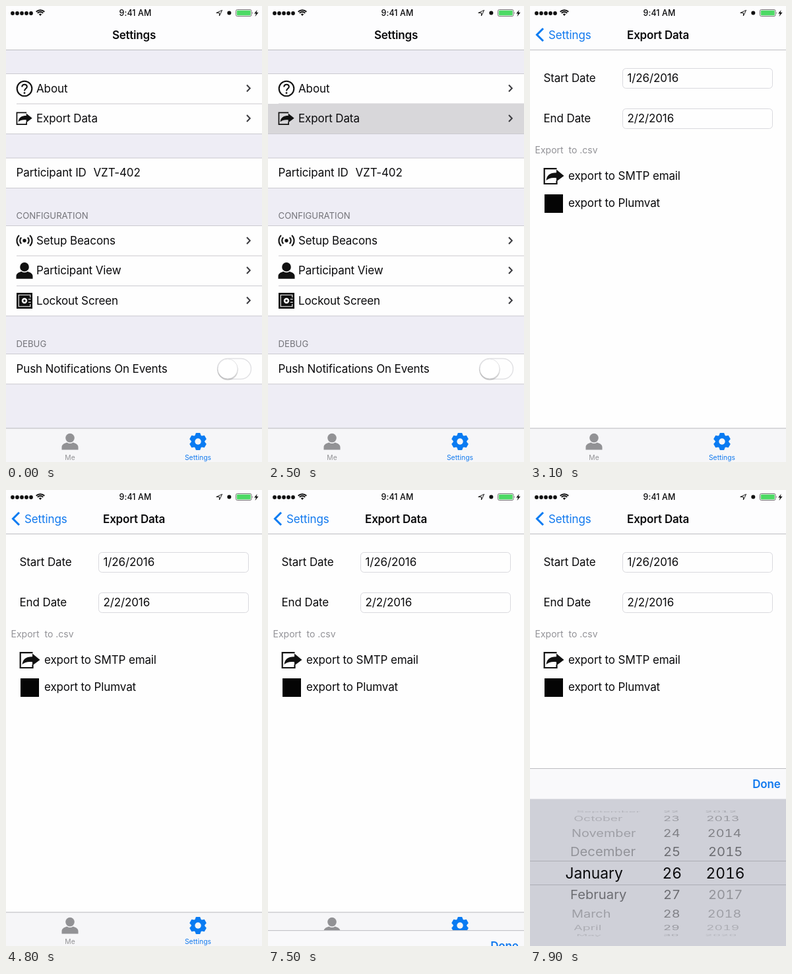
Write an HTML page that moves like this. It is 388x690 px and loops after 8000 ms.

```html
<!DOCTYPE html>
<html lang="en">
<head>
<meta charset="utf-8">
<title>Settings export</title>
<style>
html, body { margin: 0; width: 100%; height: 100%; overflow: hidden; background: #fefefe; }
svg { display: block; width: 388px; height: 690px; }
text { font: 17px Inter, sans-serif; letter-spacing: -.007em; white-space: pre; fill: #0a0a0c; }
.bold { font-weight: 600; letter-spacing: -.012em; }
.head { font-size: 13.2px; letter-spacing: 0; fill: #737379; }
.note { font-size: 14px; letter-spacing: 0; fill: #929297; }
.tab { font-size: 10.3px; letter-spacing: .005em; fill: #929295; }
.clock { font-size: 12.4px; letter-spacing: .01em; font-weight: 500; }
.wheel, .pick { letter-spacing: 0; font-variant-numeric: tabular-nums; }
.wheel { font-size: 20.2px; }
.pick { font-size: 22.8px; }
.blue { fill: #1179ee; }
.mid { text-anchor: middle; }
.end { text-anchor: end; }
</style>
</head>
<body>
<script>
const LOOP = 8000, FRAME = 100, W = 388;
const BLUE = '#0a7bf2', GREY = '#929295';

const text = (x, y, str, cls = '', more = '') => `<text x="${x}" y="${y}" class="${cls}" ${more}>${str}</text>`;
const rect = (x, y, w, h, fill, more = '') => `<rect x="${x}" y="${y}" width="${w}" height="${h}" fill="${fill}" ${more}/>`;
const rule = (x, y, color = '#cbcad0') => rect(x, y, W - x, 1, color);
const circle = (x, y, r, fill = '#111', more = '') => `<circle cx="${x}" cy="${y}" r="${r}" fill="${fill}" ${more}/>`;
const path = (d, more = 'fill="#111"') => `<path d="${d}" ${more}/>`;
const stroke = (d, width, color = '#111') => path(d, `fill="none" stroke="${color}" stroke-width="${width}"`);
const group = (body, more = '') => `<g ${more}>${body}</g>`;
const at = (x, y, body, scale = 1) => group(body, `transform="translate(${x} ${y}) scale(${scale})"`);

// Icons
const person = fill => circle(0, -5.4, 6.8, fill) +
  path('M-12.5 12.5V8.4C-12.5 4.2 -8 2.4 -4.6 1.4Q0 4.4 4.6 1.4C8 2.4 12.5 4.2 12.5 8.4V12.5Z', `fill="${fill}"`);

const share = stroke('M20 1.2H1.2V24H20V19.5', 2.2) +
  path('M4 19C5 10 11 7.2 19.5 7.2V2.6L31 12L19.5 20.4V15.2C12 14.6 8 15.5 4 19Z');

const help = stroke('M-11.3 0A11.3 11.3 0 1 0 11.3 0A11.3 11.3 0 1 0 -11.3 0', 2.1) +
  stroke('M-3.7 -2.6C-3.7 -7.6 3.8 -7.4 3.8 -2.7C3.8 0 0 .2 0 3.4', 2.1) + circle(0, 6.6, 1.4);

const arc = (r, side) => {
  const x = side * r * .72, y = r * .72;
  return stroke(`M${x} ${-y}A${r} ${r} 0 0 ${side > 0 ? 1 : 0} ${x} ${y}`, 2.1);
};
const beacon = circle(0, 0, 2.7) + [-1, 1].map(s => arc(6.6, s) + arc(11.2, s)).join('');

const safe = rect(-12, -12, 24, 24, '#111') +
  stroke('M8.8 -5V-8.8H-8.8V8.8H8.8V5', 1.1, '#fff') +
  circle(0, 0, 4.2, '#fff') + circle(0, 0, 1.7) +
  stroke('M6 -2.4H9.6M6 2.4H9.6', 1.2, '#fff');

const tooth = [0, 60, 120].map(a =>
  path('M-4.6 -9L-3.1 -13H3.1L4.6 -9V9L3.1 13H-3.1L-4.6 9Z', `fill="${BLUE}" transform="rotate(${a})"`)).join('');
const gear = tooth + circle(0, 0, 10.2, BLUE) + circle(0, 0, 4.7, '#f6f6f8');

const arrow = y => stroke(`M365 ${y - 5}L369.8 ${y}L365 ${y + 5}`, 2, '#3c3c40');

// Fixed bars
const wifi = [2.6, 6, 9].map((r, i) => i
  ? stroke(`M${-r * .7} ${-r * .7}A${r} ${r} 0 0 1 ${r * .7} ${-r * .7}`, 2)
  : path('M0 0L-2.2 -2.4A3.2 3.2 0 0 1 2.2 -2.4Z')).join('');

const statusBar = [0, 1, 2, 3, 4].map(i => circle(10 + 7 * i, 11, 2.9)).join('') +
  at(52, 15, wifi) +
  text(196, 15, '9:41 AM', 'clock mid') +
  stroke('M327.6 6.4L318.8 10.4H323.4V15Z', 1) +
  circle(338.3, 10.5, 3) +
  rect(348.5, 5.5, 23.5, 10, '#fff', 'rx="2" stroke="#666" stroke-width=".9"') +
  rect(349.8, 6.8, 20.9, 7.4, '#4cd964', 'rx=".8"') +
  path('M373 9Q374.8 10.5 373 12Z', 'fill="#666"') +
  path('M380.6 6L376.2 11.4H379L377.6 16L382.6 9.8H379.6Z');

const tabBar = rect(0, 639, W, 51, '#f6f6f8') + rule(0, 638.5, '#b9b9bd') +
  at(97, 659, person(GREY)) + text(97, 686.5, 'Me', 'tab mid') +
  at(291, 659, gear) + text(291, 686.5, 'Settings', 'tab mid blue');

// Settings page
const block = (top, rows) => {
  let out = rect(0, top, W, rows * 45.5, '#fefefe') + rule(0, top - .5);
  for (let i = 1; i < rows; i++) out += rule(16, top + i * 45.5 - .5);
  return out + rule(0, top + rows * 45.5 - .5);
};
const row = (y, icon, label) => icon + text(46, y + 6, label) + arrow(y);

const settings = rect(0, 66, W, 574, '#eeedf5') +
  block(102.5, 2) + block(230, 1) + block(332.5, 3) + block(526.5, 1) +
  rect(0, 148, W, 45, '#d8d7da', 'id="press"') +
  row(124.5, at(28, 125, help), 'About') +
  row(170, at(15.5, 160.5, share, .78), 'Export Data') +
  text(15.5, 258, 'Participant ID') + text(132.5, 257.5, 'VZT-402') +
  text(15.5, 322, 'CONFIGURATION', 'head') +
  row(355, at(28, 355, beacon), 'Setup Beacons') +
  row(400, at(28, 400.3, person('#111')), 'Participant View') +
  row(445.5, at(28, 446, safe), 'Lockout Screen') +
  text(15.5, 516, 'DEBUG', 'head') +
  text(15.5, 555, 'Push Notifications On Events') +
  rect(320.5, 533.5, 51, 31, '#fefefe', 'rx="15.5" stroke="#e0e0e3" stroke-width="1.4"') +
  circle(336, 551, 15.6, '#000', 'opacity=".1"') + circle(336, 550, 15.6, '#000', 'opacity=".1"') +
  circle(336, 549, 15, '#fff', 'stroke="#dcdcdf" stroke-width=".8"');

// Export page
const field = (y, label, value) => text(20.5, y + 6, label) +
  rect(140.5, y - 14.5, 227, 30, '#fefefe', 'rx="5" stroke="#d9d9de"') + text(147.5, y + 6, value);

const exporting = rect(0, 66, W, 574, '#fefefe') +
  field(109, 'Start Date', '1/26/2016') + field(170, 'End Date', '2/2/2016') +
  text(7.5, 223, 'Export  to .csv', 'note') +
  at(20.5, 245, share) + text(58, 263, 'export to SMTP email') +
  rect(22, 285, 28, 28, '#050505') + text(58, 304, 'export to Plumvat');

// Date wheel: rows on a cylinder, flattened towards its rims
const MONTHS = ['September', 'October', 'November', 'December', 'January', 'February', 'March', 'April', 'May'];
const SHADE = [1, .5, .4, .27, .2];

const wheelRow = k => {
  const turn = k * Math.PI / 9, flat = Math.cos(turn), n = Math.abs(k);
  const size = k ? 1 - .09 * (.94 - flat) : 1;
  const cls = k ? 'wheel' : 'pick';
  const cell = (x, str, off) => text(x - 194, k ? 7.4 : 8.3, str, cls,
    `opacity="${SHADE[n] * (off ? .62 : 1)}"`);
  const cells = cell(k ? 61 : 53.5, MONTHS[k + 4], k < 0 || k > 1) +
    cell(k ? 202 : 200.5, 26 + k) +
    cell(k ? 270 : 266.5, 2016 + k, k > 0);
  return group(cells, `transform="translate(194 ${159 + 95 * Math.sin(turn)}) scale(${size} ${k ? flat : 1})"`);
};

const picker = rect(0, 0, W, 270, '#cfd0d8') + rect(0, 0, W, 46.5, '#f9f9fb') + rule(0, 0, '#bcbcc1') +
  text(379.5, 29.7, 'Done', 'bold blue end') +
  rule(0, 140, '#acadb4') + rule(0, 176, '#acadb4') +
  [-4, -3, -2, -1, 0, 1, 2, 3, 4].map(wheelRow).join('');

document.body.innerHTML = `<svg viewBox="0 0 388 690">` +
  group(settings, 'id="list"') +
  rect(0, 66, W, 574, '#000', 'id="dim"') +
  group(exporting, 'id="page"') +
  rect(0, 0, W, 66.5, '#fdfdfe') + rule(0, 66, '#bdbdc1') +
  statusBar +
  group(text(194, 49.5, 'Settings', 'bold mid'), 'id="oldTitle"') +
  group(text(194, 49.5, 'Export Data', 'bold mid'), 'id="newTitle"') +
  group(stroke('M20 34L10.5 43.5L20 53', 3, BLUE), 'id="backArrow"') +
  group(text(28, 49.5, 'Settings', 'blue'), 'id="backLabel"') +
  tabBar + group(picker, 'id="picker"') + '</svg>';

// Motion
const el = id => document.getElementById(id);
const clamp = v => Math.min(1, Math.max(0, v));
const spring = (ms, rate) => {
  const x = Math.max(0, ms) * rate / 1000, p = 1 - (1 + x) * Math.exp(-x);
  return p > .994 ? 1 : p;
};
const place = (id, x, y, opacity = 1) => {
  el(id).setAttribute('transform', `translate(${x} ${y})`);
  el(id).setAttribute('opacity', opacity);
};

function draw(now) {
  const t = Math.floor(now % LOOP / FRAME) * FRAME;
  const push = spring(t - 2550, 15.6), rise = spring(t - 7472.5, 18);
  const rest = 1 - push;
  el('press').setAttribute('opacity', t >= 2500 ? 1 : 0);
  place('list', -116.4 * push, 0);
  el('dim').setAttribute('opacity', .1 * push);
  place('page', W * rest, 0);
  place('oldTitle', -124 * push, 0, clamp(1 - 1.17 * push));
  place('newTitle', 275 * rest, 0, push);
  place('backArrow', 0, 0, clamp((push - .62) / .38));
  place('backLabel', 132 * rest, 0, clamp((push - .7) / .3));
  place('picker', 0, 690 - 269 * rise);
}

const start = performance.now();
function tick() {
  draw(performance.now() - start);
  requestAnimationFrame(tick);
}
tick();
</script>
</body>
</html>
```
